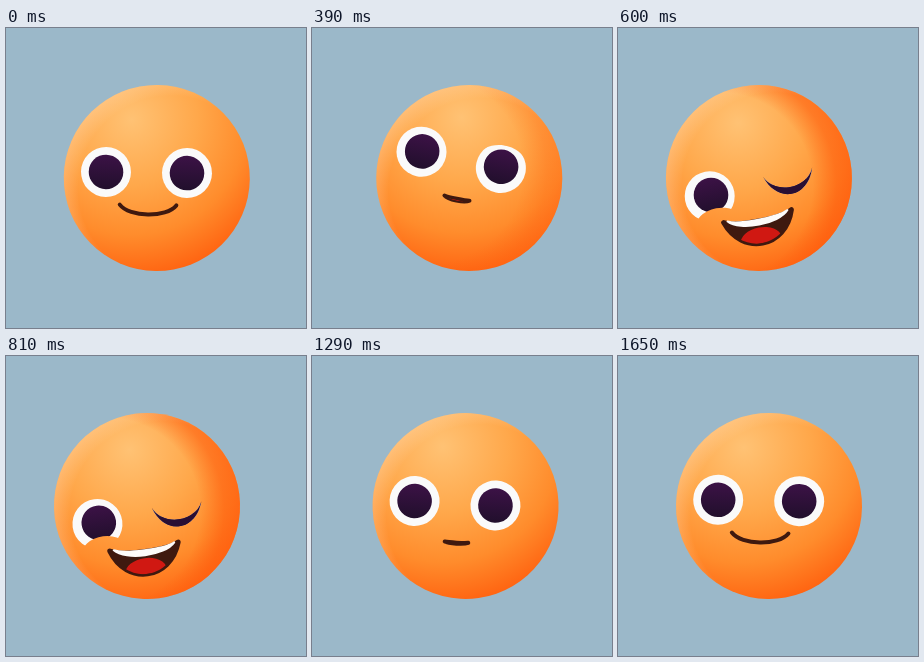
Write an HTML page that moves like this. It is 300x300 px and loops after 1680 ms.

```html
<!DOCTYPE html>
<html lang="en">
<head>
<meta charset="utf-8">
<title>Winking ball</title>
<style>
  html, body { margin: 0; width: 100%; height: 100%; overflow: hidden; background: #9bb8c9; }
  svg { display: block; width: 100%; height: 100%; }
</style>
</head>
<body>
<svg viewBox="0 0 300 300">
  <defs>
    <radialGradient id="skin" gradientUnits="userSpaceOnUse" cx="-26" cy="-58" r="156">
      <stop offset="0" stop-color="#ffc274"/>
      <stop offset=".42" stop-color="#ffa84b"/>
      <stop offset=".74" stop-color="#ff8c2c"/>
      <stop offset="1" stop-color="#ff6512"/>
    </radialGradient>
    <radialGradient id="rim" gradientUnits="userSpaceOnUse" cx="14" cy="10" r="110">
      <stop offset=".84" stop-color="#ffe0bc" stop-opacity="0"/>
      <stop offset="1" stop-color="#ffe0bc" stop-opacity=".35"/>
    </radialGradient>
    <radialGradient id="shadow" gradientUnits="userSpaceOnUse" cx="-40" cy="0" r="133">
      <stop offset=".7" stop-color="#ff5a0c" stop-opacity="0"/>
      <stop offset=".88" stop-color="#ff5a0c" stop-opacity=".55"/>
      <stop offset="1" stop-color="#ff5a0c" stop-opacity=".65"/>
    </radialGradient>
    <linearGradient id="iris" x1="0" y1="0" x2="0" y2="1">
      <stop offset="0" stop-color="#3c1246"/>
      <stop offset="1" stop-color="#210f2c"/>
    </linearGradient>
    <mask id="cheekMask" maskUnits="userSpaceOnUse" x="-40" y="-40" width="80" height="80">
      <rect x="-40" y="-40" width="80" height="80" fill="#fff"/>
      <ellipse id="cheek" cx="4" rx="24" ry="17"/>
    </mask>
    <clipPath id="lidClip"><path id="lid"/></clipPath>
    <clipPath id="mouthClip"><path id="mouthHole"/></clipPath>
  </defs>
  <rect width="300" height="300" fill="#9bb8c9"/>
  <g id="ball">
    <circle r="93" fill="url(#skin)"/>
    <circle id="shade" r="93" fill="url(#shadow)"/>
    <circle r="93" fill="url(#rim)"/>
  </g>
  <g id="face">
    <g transform="translate(-40.5 0)">
      <g mask="url(#cheekMask)">
        <circle r="25" fill="#fafafa"/>
        <circle id="pupilL" r="17.3" fill="url(#iris)"/>
      </g>
    </g>
    <g transform="translate(40.5 0)">
      <g clip-path="url(#lidClip)">
        <circle r="25" fill="#fafafa"/>
        <circle id="pupilR" r="17.3" fill="url(#iris)"/>
      </g>
      <path id="wink" fill="#2a0f33"/>
    </g>
    <path id="mouth" fill="#3f190f" stroke="#3f190f" stroke-linejoin="round"/>
    <g clip-path="url(#mouthClip)"><ellipse id="tongue" fill="#d01812"/></g>
    <path id="teeth" fill="#fdfbfa" stroke="#fdfbfa" stroke-width="2" stroke-linejoin="round"/>
  </g>
</svg>
<script>
const LOOP = 1680;
const RELEASE = 917;   // the grin lets go and the head swings back
const SWING = 290;     // half a swing
const DAMPING = 0.55;  // what is left after half a swing

const $ = id => document.getElementById(id);
const mix = (a, b, p) => a + (b - a) * p;
const clamp = v => Math.min(1, Math.max(0, v));
const ease = (a, b, t) => {
  const u = clamp((t - a) / (b - a));
  return u * u * (3 - 2 * u);
};
const set = (id, attrs) => {
  for (const k in attrs) $(id).setAttribute(k, attrs[k]);
};
const blend = (a, b, px, py = px) => ({
  x: mix(a.x, b.x, px),
  fx: mix(a.fx, b.fx, px),
  y: mix(a.y, b.y, py),
  tilt: mix(a.tilt, b.tilt, px)
});

// Head: ball centre x, face offset from it, face y, tilt
const IDLE = { x: 150.8, fx: -10.3, y: 144.5, tilt: 0.8 };
const LOOK = { x: 158.3, fx: -8, y: 130, tilt: 13 };
const LEAN = { x: 140.9, fx: -9.4, y: 160.5, tilt: -11 };
const REST = { x: 141, fx: -9.4, y: 162.7, tilt: -7.5 };

// Mouth: centre x, corner y, half width, upper sag, lower sag
const SMILE = [2, 32.5, 28.3, 9.5, 9.5];
const TINY = [3.6, 38.8, 11.8, 0.5, 1.5];
const GRIN = [2.7, 28.5, 34.5, 5, 27.5];

function headAt(t) {
  if (t < RELEASE) {
    const look = blend(IDLE, LOOK, ease(0, 240, t));
    const lean = blend(look, LEAN, ease(360, 570, t));
    return blend(lean, REST, ease(570, 810, t));
  }
  const n = (t - RELEASE) / SWING;
  const swing = 1 - Math.cos(n * Math.PI) * DAMPING ** n;
  return blend(REST, IDLE, swing, Math.sin(clamp(n / 2) * Math.PI / 2));
}

function mouthAt(t) {
  const steps = [[0, 210, TINY], [370, 540, GRIN], [1060, 1200, TINY], [1290, 1530, SMILE]];
  return steps.reduce((m, [a, b, to]) => m.map((v, i) => mix(v, to[i], ease(a, b, t))), SMILE);
}

// Closed shape between two arcs that share their corners.
function bowl(x, y, w, top, bottom) {
  const k = w * 0.65, ty = y + top * 4 / 3, by = y + bottom * 4 / 3;
  return `M${x - w} ${y}C${x - k} ${ty} ${x + k} ${ty} ${x + w} ${y}` +
    `C${x + k} ${by} ${x - k} ${by} ${x - w} ${y}Z`;
}

function draw(t) {
  const { x, fx, y, tilt } = headAt(t);
  set('ball', { transform: `translate(${x} 150) rotate(${tilt})` });
  set('face', { transform: `translate(${x + fx} ${y}) rotate(${tilt})` });

  const p = ease(300, 510, t) - ease(1065, 1200, t);
  const corner = -9 * p;
  const lid = bowl(0, corner, mix(31, 25, p), mix(-42, 6, p) - corner, mix(46, 13, p) - corner);
  set('skin', { cx: mix(-26, -10, p) });
  set('shade', { opacity: p });
  set('cheek', { cy: mix(60, 30, p) });
  set('pupilL', { cx: 1.5 * p, cy: -p });
  set('pupilR', { cy: -3 * p });
  set('lid', { d: p > 0 ? lid : 'M-30-30H30V30H-30Z' });
  set('wink', { d: lid, opacity: clamp((p - 0.7) / 0.25) });

  const [mx, my, w, top, bottom] = mouthAt(t);
  const open = Math.max(0, (bottom - top - 1) / 21.5);
  const shape = bowl(mx, my, w, top, bottom);
  set('mouth', { d: shape, 'stroke-width': 4 + open });
  set('mouthHole', { d: shape });
  set('tongue', { cx: mx - 1, cy: my + bottom - 3 * open, rx: w * 0.6, ry: 13 * open });
  set('teeth', {
    d: bowl(mx, my - 0.3, w - 4, 4, 4 + 5 * open),
    opacity: clamp((open - 0.15) / 0.2)
  });
}

const start = performance.now();
function tick() {
  draw((performance.now() - start) % LOOP);
  requestAnimationFrame(tick);
}
tick();
</script>
</body>
</html>
```
